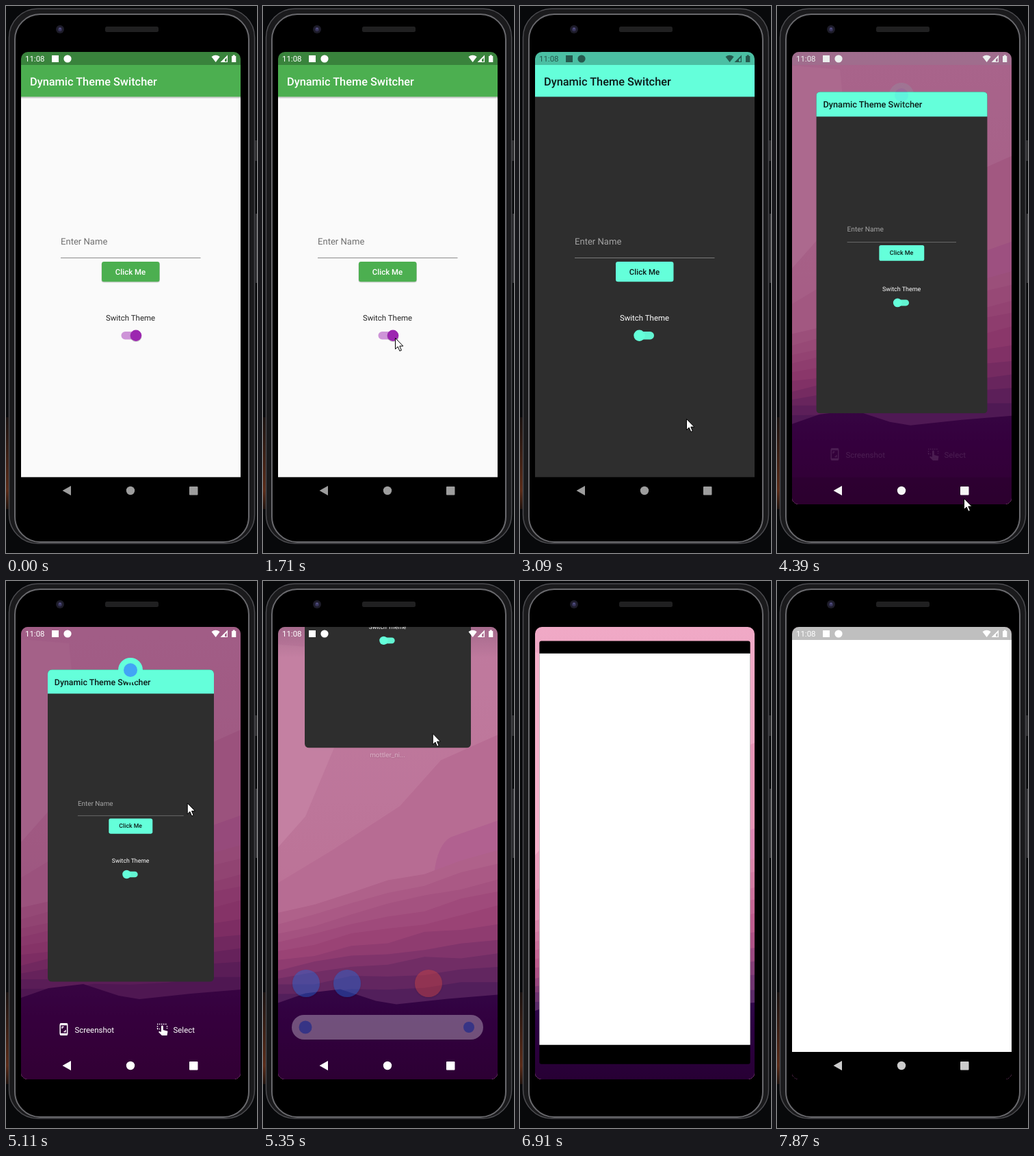
These frames come from a looping animation (367x798 px, 7990 ms). An HTML page:

```html
<!DOCTYPE html>
<html lang="en">
<head>
<meta charset="utf-8">
<title>Theme switch on a phone</title>
<style>
html, body { margin: 0; width: 100%; height: 100%; overflow: hidden; background: #08090b; }
svg { display: block; width: 100%; height: 100%; font-family: Roboto, sans-serif; text-rendering: geometricPrecision; }
</style>
</head>
<body>
<svg viewBox="0 0 367 798" xmlns="http://www.w3.org/2000/svg">
  <defs>
    <clipPath id="screenClip"><rect x="22" y="67" width="321" height="660" rx="10"/></clipPath>
    <clipPath id="appClip"><rect id="appShape" x="22" y="86" width="321" height="601.7"/></clipPath>
    <linearGradient id="sky" x1="0" y1="0" x2="0" y2="1">
      <stop offset="0" stop-color="#f0a9c6"/><stop offset=".5" stop-color="#eca0bd"/><stop offset="1" stop-color="#df8baf"/>
    </linearGradient>
    <linearGradient id="ground" x1="0" y1="0" x2="0" y2="1">
      <stop offset="0" stop-color="#30084b"/><stop offset=".3" stop-color="#2c0042"/><stop offset="1" stop-color="#25002e"/>
    </linearGradient>
    <linearGradient id="shade" x1="0" y1="0" x2="0" y2="1">
      <stop offset="0" stop-color="#302038" stop-opacity=".45"/><stop offset="1" stop-color="#302038" stop-opacity="0"/>
    </linearGradient>
    <linearGradient id="ember" x1="0" y1="0" x2="0" y2="1">
      <stop offset="0" stop-color="#1a1210"/><stop offset=".8" stop-color="#5c2c18"/><stop offset="1" stop-color="#20130e"/>
    </linearGradient>
    <filter id="soft" x="-20%" y="-40%" width="140%" height="190%"><feDropShadow dx="0" dy="1" stdDeviation="1" flood-opacity=".35"/></filter>
  </defs>

  <!-- phone body -->
  <rect width="367" height="798" fill="#08090b"/>
  <path d="M365.5 196V226M366 303V404" stroke="#3c3c3f" stroke-width="2"/>
  <rect y="600" width="4" height="134" fill="url(#ember)"/>
  <rect x="4.5" y="4" width="359" height="780" rx="42" fill="#1a1a1c" stroke="#4c4c50" stroke-width="1.5"/>
  <rect x="13" y="12" width="342" height="770" rx="37" stroke="#69696d" stroke-width="2"/>
  <circle cx="79" cy="34" r="6" fill="#1d1c29"/><circle cx="79" cy="34" r="3" fill="#363358"/><circle cx="79" cy="33" r="1.2" fill="#5a568a"/>
  <rect x="145" y="30" width="78" height="8" rx="2.5" fill="#202021"/>

  <g clip-path="url(#screenClip)">
    <g id="wall">
      <rect x="22" y="60" width="321" height="700" fill="url(#sky)"/>
      <path d="M22 104L92 110 106 250 62 355 22 400Z" fill="#f6b0ca"/>
      <path d="M22 452L100 405 200 340 260 273 343 236V760H22Z" fill="#e594b5"/>
      <path d="M250 440Q255 395 275 385L343 361V440Z" fill="#dc86b2"/>
      <g id="bands"></g>
      <path fill="url(#ground)" d="M22 627L62 613 113 607 165 624 195 629 270 621 343 615V760H22Z"/>
    </g>
    <rect id="dim" x="22" y="67" width="321" height="660" fill="#400038"/>
    <rect id="topShade" x="22" y="67" width="321" height="45" fill="url(#shade)"/>

    <g id="home">
      <g fill="#fff" font-size="20" letter-spacing=".12" filter="url(#soft)">
        <text x="73" y="146">Tuesday, Oct 13</text><text x="249" y="146">27°C</text>
      </g>
      <circle cx="234" cy="138" r="9" fill="#fbd53b"/>
      <path d="M224 145.5a3 3 0 0 1 1-5.5a3.5 3.5 0 0 1 6.500 1a2.300 2.300 0 0 1 0 4.500Z" fill="#f3eef2"/>
      <circle cx="182" cy="218" r="20" fill="#fff" filter="url(#soft)"/>
      <circle cx="182" cy="218" r="11" fill="#42a5f5"/>
      <text x="182" y="257" text-anchor="middle" font-size="9.8" fill="#fff" filter="url(#soft)">mottler_ni...</text>
      <g filter="url(#soft)">
        <circle cx="63" cy="587" r="20" fill="#1a73e8"/><circle cx="123" cy="587" r="20" fill="#1a73e8"/>
        <circle cx="242" cy="587" r="20" fill="#db4a3d"/>
      </g>
      <rect x="42" y="633" width="280" height="36" rx="18" fill="#d6ccdb"/>
      <circle cx="62" cy="651" r="9.5" fill="#4285f4"/><circle cx="301" cy="651" r="8" fill="#4285f4"/>
    </g>

    <g id="actions" fill="#fff" font-size="11.44">
      <text x="100.5" y="658.5">Screenshot</text><text x="244.5" y="658.5">Select</text>
      <rect x="79.2" y="645.800" width="10.500" height="16.500" rx="1.500" fill="none" stroke="#fff" stroke-width="1.500"/>
      <path d="M79 647h11M79 661h11" stroke="#fff" stroke-width="2.500"/>
      <path d="M82 653v-2.500h2.500M87 655v2.500h-2.500" fill="none" stroke="#fff" stroke-width="1.300"/>
      <path d="M221 646.500h15M221.500 649v4M235.500 649v4M221 653.500h4" stroke="#fff" stroke-width="1.500" stroke-dasharray="1.500"/>
      <path d="M227 650a1.400 1.400 0 0 1 2.800 0v5l6.700 1.800-1 6.200h-7.500l-5-5 1-1 3 .8Z"/>
    </g>

    <g id="app" clip-path="url(#appClip)">
      <rect id="page" x="22" y="86" width="321" height="601.7"/>
      <rect id="barShadow" x="22" y="132" width="321" height="2.5"/>
      <rect id="bar" x="22" y="86" width="321" height="46.4"/>
      <text id="title" x="35" y="115.5" font-size="16.35" font-weight="500">Dynamic Theme Switcher</text>
      <text id="hint" x="80" y="348" font-size="13.07">Enter Name</text>
      <rect id="line" x="80" y="367" width="204.500" height="1"/>
      <rect id="buttonShadow" x="139.500" y="374" width="85.500" height="29.500" rx="3.500"/>
      <rect id="button" x="140" y="373" width="84.500" height="29.300" rx="3.300"/>
      <text id="buttonText" x="182" y="391.500" text-anchor="middle" font-size="11.44" font-weight="500">Click Me</text>
      <text id="label" x="182" y="458.500" text-anchor="middle" font-size="11.44">Switch Theme</text>
      <rect id="track" x="168.500" y="475" width="27.500" height="11.400" rx="5.700"/>
      <circle id="thumbShadow" cy="481.500" r="8.600"/>
      <circle id="thumb" cy="480.700" r="8.200"/>
    </g>
    <g id="badge"><circle cx="182" cy="130" r="18" fill="#64ffda"/><circle cx="182" cy="130" r="10" fill="#42a5f5"/></g>

    <rect id="launch" rx="3"/><rect id="blank" fill="#fff"/>
    <rect id="statusBg" x="22" y="67" width="321" height="19"/>
    <rect id="navBg" x="22" y="687.7" width="321" height="40"/>
    <g id="status">
      <text x="28" y="81" font-size="11.44">11:08</text>
      <rect x="67" y="72" width="10" height="10"/><circle cx="90" cy="77" r="5.6"/>
      <path d="M300.500 74Q306.500 69.300 312.700 74L306.600 82Z"/>
      <path d="M324 71.500V82H313.500ZM322.700 75.500L320 78V81H322.700Z" fill-rule="evenodd"/>
      <path d="M330 73h1.700v-1.500h3v1.500h1.600v9h-6.300Z"/>
    </g>
    <g id="nav">
      <path d="M82.500 707L95 700V714Z"/><circle cx="182" cy="707" r="6.200"/>
      <rect x="268" y="701" width="12.500" height="12.500" rx="1"/>
    </g>
  </g>
  <path id="cursor" d="M0 0V16L3.700 12.500 6.400 18.800 8.900 17.700 6.300 11.600H11.300Z" fill="#fff" stroke="#000" stroke-linejoin="round"/>
</svg>
<script>
const LOOP = 7990, STEP = 120;
const el = {};
document.querySelectorAll('[id]').forEach(n => el[n.id] = n);

const set = (id, attrs) => { for (const k in attrs) el[id].setAttribute(k, attrs[k]); };
const fill = (id, c) => set(id, { fill: c });
const show = (id, o) => set(id, { opacity: o });
const lerp = (a, b, k) => a + (b - a) * k;
const span = (t, a, b) => Math.min(1, Math.max(0, (t - a) / (b - a)));
const easeOut = (k, n = 3) => 1 - (1 - k) ** n;
const smooth = k => k * k * (3 - 2 * k);

function mix(a, b, k) {
  const part = (c, i) => parseInt(c.slice(i, i + 2), 16);
  return `rgb(${[1, 3, 5].map(i => Math.round(lerp(part(a, i), part(b, i), k)))})`;
}

const ticks = [0];
for (const [a, b] of [[870, 1710], [2200, 3090], [3090, 3780], [4150, 7150], [7510, 7510], [7750, 7870]]) {
  const n = Math.ceil((b - a) / STEP) || 1;
  for (let i = 0; i <= n; i++) ticks.push(Math.round(lerp(a, b, i / n)));
}

// Pointer strokes: time span, bend and end point of a quadratic curve
const strokes = [
  { from: 870, to: 1650, bend: [150, 532], end: [193, 484] },
  { from: 2640, to: 3090, bend: [180, 490], end: [243, 602] },
  { from: 3090, to: 3780, bend: [313, 793], end: [273, 718] },
  { from: 4500, to: 5590, bend: [288, 278], end: [223, 151] },
  { from: 5590, to: 6550, bend: [248, 418], end: [181, 221] }
];

function pointer(t) {
  let pos = [46, 532];
  for (const { from, to, bend, end } of strokes) {
    const k = span(t, from, to);
    pos = pos.map((p, i) => lerp(lerp(p, bend[i], k), lerp(bend[i], end[i], k), k));
  }
  return pos;
}

// Light and dark colour of each part
const palette = {
  page: ['#fafafa', '#2e2e2e'], bar: ['#4caf50', '#64ffda'], title: ['#ffffff', '#0b1a17'],
  hint: ['#707070', '#a3a3a3'], line: ['#8c8c8c', '#7a7a7a'], button: ['#4caf50', '#64ffda'],
  buttonText: ['#ffffff', '#0b1a17'], label: ['#252525', '#ffffff'], track: ['#ce94d8', '#62f5d2'],
  thumb: ['#9c27b0', '#64ffda'], statusBg: ['#39833c', '#4bbfa3'], status: ['#ffffff', '#25594e']
};

function paintBands(count = 10) {
  let seed = 11;
  const random = () => (seed = seed * 16807 % 2147483647) / 2147483647;
  for (let i = 0; i < count; i++) {
    const k = i / (count - 1), points = ['343,760', '22,760'];
    for (let j = 0; j <= 6; j++) {
      const y = lerp(lerp(500, 404, j / 6), lerp(614, 594, j / 6), k) + (random() - .5) * 9;
      points.push(`${22 + j * 53.5},${y.toFixed(1)}`);
    }
    const color = k < .5 ? mix('#d985a9', '#b9578a', k * 2) : mix('#b9578a', '#5a2a68', k * 2 - 1);
    el.bands.innerHTML += `<polygon fill="${color}" points="${points.join(' ')}"/>`;
  }
}

function draw(t) {
  const theme = smooth(span(t, 2120, 2480));
  const zoom = easeOut(span(t, 4090, 4640));
  const swipe = span(t, 5110, 5480);
  const toHome = smooth(span(t, 5170, 5590));
  const opening = t >= 6670, opened = t >= 7150;
  const ready = span(t, 7630, 7870);
  const overview = zoom * (1 - toHome);
  const homeShown = toHome * (1 - span(t, 6600, 6780));

  // Theme
  for (const id in palette) fill(id, mix(...palette[id], theme));
  const cx = lerp(190, 174.5, theme);
  set('thumb', { cx });
  set('thumbShadow', { cx });
  for (const id of ['barShadow', 'buttonShadow', 'thumbShadow']) show(id, .18 * (1 - theme));

  // App card: shrink, then swipe away
  const scale = lerp(1, .757, zoom), lift = -600 * swipe * swipe * (2 - swipe);
  const left = lerp(22, 61, zoom), top = lerp(86, 129.2, zoom) + lift;
  set('app', { transform: `translate(${left} ${top}) scale(${scale}) translate(-22 -86)` });
  set('appShape', { rx: 8 * zoom });
  show('app', swipe < 1 ? 1 : 0);
  set('badge', { transform: `translate(0 ${lift})` });
  const extras = span(t, 4350, 4700);
  show('badge', swipe < 1 ? extras : 0);
  show('actions', extras * (1 - span(t, 5110, 5350)));

  // Wallpaper and home
  set('wall', { transform: `translate(0 ${-19 * overview})` });
  show('wall', zoom > 0 ? 1 : 0);
  show('dim', .45 * overview);
  show('home', homeShown);
  show('topShade', homeShown);

  // Launch window grows out of the icon
  const grow = n => easeOut(span(t, 6630, 7150), n);
  const x = lerp(162, 22, grow(4)), y = lerp(198, 67, grow(2.4));
  const width = lerp(202, 343, grow(4)) - x, height = lerp(238, 727, grow(4)) - y;
  const above = lerp(2, 19, grow(4)), below = lerp(2, 40, grow(1.5));
  set('launch', { x, y, width, height });
  set('blank', { x, y: y + above, width, height: height - above - below });
  show('launch', opening ? 1 : 0);
  show('blank', opening ? 1 : 0);

  // System bars
  if (opened) fill('statusBg', mix('#000000', '#bfbfbf', ready));
  if (zoom > 0) fill('status', mix('#25594e', '#ffffff', zoom));
  fill('nav', t < 7510 ? mix('#9d9d9d', '#ffffff', zoom) : mix('#e4e4e4', '#cccccc', ready));
  show('statusBg', opened ? 1 : 1 - zoom);
  show('navBg', opened ? 1 : 1 - zoom);
  const icons = opened ? 1 : 1 - span(t, 6600, 6780);
  show('status', icons);
  show('nav', icons);

  set('cursor', { transform: `translate(${pointer(t).map(v => v + .5)})` });
  show('cursor', t >= 870 && !opening ? 1 : 0);
}

let start, last = -1;
function frame(now) {
  start ??= now;
  const t = (now - start) % LOOP;
  const tick = ticks.findLast(v => v <= t);
  if (tick !== last) draw(last = tick);
  requestAnimationFrame(frame);
}
paintBands();
draw(0);
requestAnimationFrame(frame);
</script>
</body>
</html>
```
